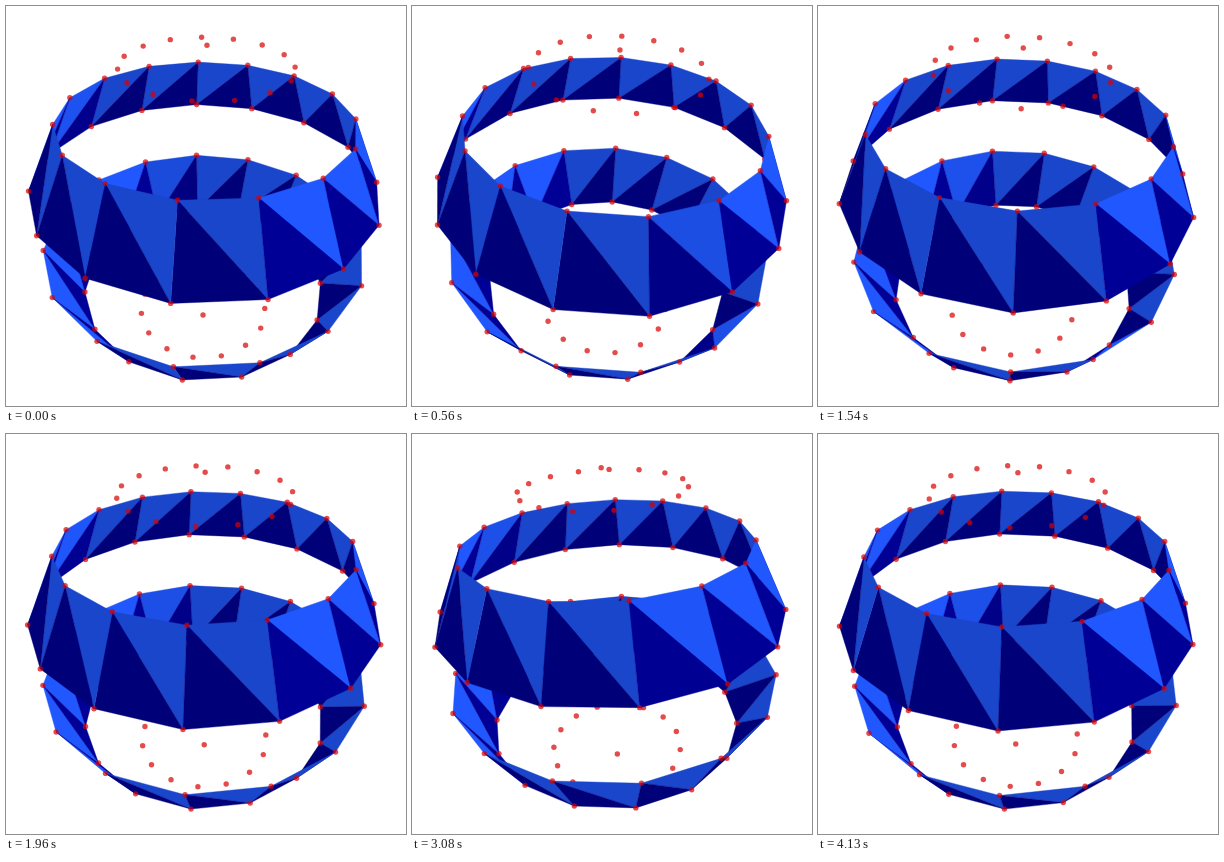
These frames come from a looping animation (400 px wide and 400 px high, 4.2 s). An HTML page with a canvas:

```html
<!DOCTYPE html>
<html lang="en">
<head>
<meta charset="utf-8">
<title>Banded sphere</title>
<style>
  html, body { margin: 0; width: 100%; height: 100%; overflow: hidden; background: #fff; }
  canvas { display: block; }
</style>
</head>
<body>
<canvas id="stage" width="400" height="400"></canvas>
<script>
const ctx = document.getElementById('stage').getContext('2d');
const { sin, cos, PI, min, max, hypot, floor } = Math;
const RAD = PI / 180;
const STEP = 70, STEPS = 60;
const SLICES = 15, STACKS = 7;
const BANDS = [2, 4];               // upper ring of each filled band
const CAMERA = 2.9, FOCUS = 484;    // distance in radii, focal length in pixels
const FLATTEN = 0.965;              // polar radius relative to the equator
const LIGHT = [32, 87, 255], DARK = [0, 0, 150];

// Returns a projector from sphere coordinates to camera and screen space.
function makeView(tilt, roll) {
  const ct = cos(tilt), st = sin(tilt), cr = cos(roll), sr = sin(roll);
  return (x, y, z) => {
    const rx = x * cr + y * sr, ry = y * cr - x * sr;
    const Y = ry * ct - z * st, Z = ry * st + z * ct;
    const k = FOCUS / (CAMERA - Z);
    return { x: rx, y: Y, z: Z, sx: 198.6 + rx * k, sy: 200.8 - Y * k, front: Z > 1 / CAMERA };
  };
}

function fill(points, base, shade) {
  const color = `rgb(${base.map(c => c * shade).join()})`;
  ctx.beginPath();
  for (const p of points) ctx.lineTo(p.sx, p.sy);
  ctx.closePath();
  ctx.fillStyle = ctx.strokeStyle = color;
  ctx.fill();
  ctx.stroke();
}

// Ambient light plus one lamp from the upper right; both sides are lit.
function shadeOf(a, b, c, front) {
  const u = [b.x - a.x, b.y - a.y, b.z - a.z];
  const v = [c.x - a.x, c.y - a.y, c.z - a.z];
  const nx = v[1] * u[2] - v[2] * u[1];
  const ny = v[2] * u[0] - v[0] * u[2];
  const nz = v[0] * u[1] - v[1] * u[0];
  const lit = (nx + ny) / (hypot(nx, ny, nz) * Math.SQRT2);
  return min(1, 0.8 + max(0, front ? lit : -lit));
}

function dot(p) {
  ctx.beginPath();
  ctx.arc(p.sx, p.sy, 2.7, 0, 2 * PI);
  ctx.fillStyle = 'rgba(217, 0, 0, .7)';
  ctx.fill();
}

function draw(n) {
  const wave = sin(2 * PI * n / STEPS + 11 * RAD);
  const view = makeView((35.4 + 5.3 * wave) * RAD, 0.002 + 0.051 * wave);
  const spin = (-8.25 - 0.75 * n - 0.8 * wave) * RAD;

  const rings = [];
  for (let j = 0; j <= STACKS; j++) {
    const lat = j * PI / STACKS, r = sin(lat);
    const count = j % STACKS ? SLICES : 1;
    rings.push(Array.from({ length: count }, (_, i) => {
      const a = spin + i * 2 * PI / SLICES;
      return view(r * sin(a), FLATTEN * cos(lat), r * cos(a));
    }));
  }

  const faces = [];
  for (const j of BANDS) {
    for (let i = 0; i < SLICES; i++) {
      const k = (i + 1) % SLICES;
      const quad = [rings[j][i], rings[j][k], rings[j + 1][k], rings[j + 1][i]];
      const [a, b, c] = quad;
      const front = (b.sx - a.sx) * (c.sy - a.sy) > (b.sy - a.sy) * (c.sx - a.sx);
      if (front) for (const p of quad) p.front = true;
      faces.push({ quad, front, shade: shadeOf(a, b, c, front) });
    }
  }

  ctx.fillStyle = '#fff';
  ctx.fillRect(0, 0, 400, 400);
  ctx.lineWidth = 0.4;
  ctx.lineJoin = 'round';
  const dots = rings.flat();
  for (const side of [false, true]) {
    for (const { quad, front, shade } of faces) {
      if (front !== side) continue;
      const [a, b, c, d] = quad;
      fill([a, b, c], LIGHT, shade);
      fill([a, c, d], DARK, shade);
    }
    dots.filter(p => p.front === side).forEach(dot);
  }
}

function tick() {
  draw(floor(performance.now() / STEP + 0.02) % STEPS);
  requestAnimationFrame(tick);
}
tick();
</script>
</body>
</html>
```
